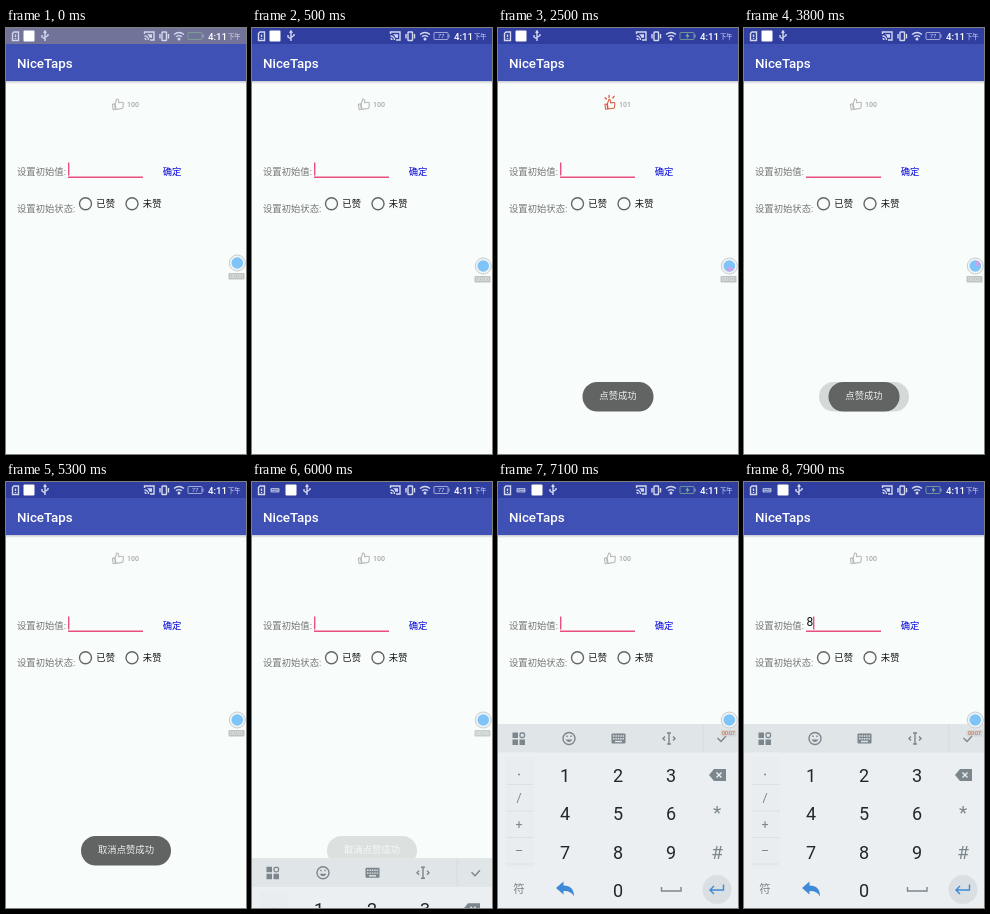
These frames come from a looping animation (240 by 426 pixels, 8000 ms). An HTML page:

```html
<!DOCTYPE html>
<html lang="zh-CN">
<head>
<meta charset="utf-8">
<style>
html, body { margin: 0; width: 100%; height: 100%; overflow: hidden; background: #f8fcfa; }
svg { display: block; width: 100vw; height: 100vh; font: 9.33px Roboto, "Noto Sans CJK SC", "Noto Sans CJK", sans-serif; }
.line { fill: none; stroke-width: 1.4; }
.mid { text-anchor: middle; }
</style>
</head>
<body>
<svg viewBox="0 0 240 426">
  <defs>
    <linearGradient id="shade" x2="0" y2="1"><stop stop-color="#c6cad0"/><stop offset="1" stop-color="#f8fcfa"/></linearGradient>
    <clipPath id="digitClip"><rect x="120" y="72" width="20" height="9"/></clipPath>
  </defs>
  <rect width="240" height="426" fill="#f8fcfa"/>
  <rect y="53" width="240" height="3" fill="url(#shade)"/>
  <rect y="16" width="240" height="37" fill="#3f51b5"/>
  <rect id="status" width="240" height="16" fill="#303f9f"/>
  <text x="11" y="40" font-size="13.33" font-weight="500" fill="#fff">NiceTaps</text>

  <!-- status bar -->
  <g stroke="#d3d8ee" class="line" stroke-width=".9">
    <path d="M6.500 5.500L8 4h4.500v8.500h-6zM9.500 6.500v2.500M9.500 10v1"/>
    <g id="boardIcon"><rect x="18.500" y="6" width="9" height="4.500" rx="1" fill="#a9b1da" stroke="none"/><path d="M20 7.500h6M20.500 9.300h5" stroke="#303f9f" stroke-width=".7" stroke-dasharray="1 .6"/></g>
    <g id="notes">
      <rect x="17.500" y="2.500" width="11" height="11" rx="1" fill="#fff" stroke="none"/>
      <path d="M39 4v9M39 11l-3-2V7M39 9.500l3-2V6M37.700 4.800L39 3l1.300 1.800"/>
    </g>
    <path d="M138.500 6V4h9.500v8h-4M138.500 8a4 4 0 0 1 4 4M138.500 10.500a1.500 1.500 0 0 1 1.500 1.500"/>
    <path d="M141 6.200h5v3.600h-2.500q-.5-2.500-2.500-3.600z" fill="#d3d8ee" stroke="none"/>
    <rect x="156" y="4" width="4.500" height="8.500" rx=".6"/>
    <path d="M154 6v4.500M162.500 6v4.500"/>
    <path d="M168 6.500q5-4 10 0M170 8.800q3-2.400 6 0"/>
    <circle cx="173" cy="11" r=".8" fill="#fff"/>
    <rect id="cell" x="182" y="4.500" width="14" height="7" rx=".8" stroke-width=".8"/>
  </g>
  <path d="M197 6.500v3" stroke="#bcc3e5" stroke-width=".8"/>
  <text id="level" class="mid" x="189" y="10.300" font-size="6" fill="#cfd5ee">77</text>
  <path id="bolt" d="M190 5l-2.500 3.300h2L188.500 11l3-3.500h-2z" fill="#8fd08a"/>
  <text x="202" y="11.700" font-size="9.700" font-weight="500" fill="#fff">4:11</text>
  <text x="222" y="11.200" font-size="6.300" fill="#e4e7f6">下午</text>

  <!-- like button -->
  <g id="hand" class="line" stroke-linejoin="round">
    <g transform="translate(112 76) rotate(-8) scale(.56) translate(-12 -12)" stroke-width="2">
      <path d="M2 11h4v10H2zM7 11l4-8q3 0 3 3l-.5 4H20q2 0 1.600 2L20 19q-.4 2-2.400 2H7z"/>
    </g>
    <path id="rays" d="M108 70.500l-1.500-1.500M111 69v-2.500M115 69.500l1.500-2" stroke-linecap="round"/>
  </g>
  <g font-size="7" font-weight="500" fill="#a6a6a6" clip-path="url(#digitClip)">
    <text x="121" y="78.700">10</text>
    <text id="zero" x="128.900">0</text>
    <text id="one" x="128.900">1</text>
  </g>

  <!-- form -->
  <g fill="#757575">
    <text x="11" y="147">设置初始值:</text>
    <text x="11" y="183.500">设置初始状态:</text>
  </g>
  <text x="156.700" y="147" fill="#0000d8">确定</text>
  <g fill="#111">
    <text x="90.300" y="179">已赞</text>
    <text x="136.800" y="179">未赞</text>
    <text id="typed" x="62.500" y="144" font-size="12">8</text>
  </g>
  <g class="line" stroke="#666"><circle cx="79.500" cy="175.700" r="6"/><circle cx="126" cy="175.700" r="6"/></g>
  <path d="M62 149.200h75" class="line" stroke="#e9507f"/>
  <path id="caret" d="M62.700 134.500v13" class="line" stroke="#e9507f"/>

  <!-- toasts -->
  <g id="toast2"><rect x="75" y="354" width="90" height="29.500" rx="14.700" fill="#616462"/><text class="mid" x="120" y="371.200" fill="#eee">取消点赞成功</text></g>
  <g id="toast1"><rect x="84.500" y="354" width="71" height="29.500" rx="14.700" fill="#616462"/><text class="mid" x="120" y="371.200" fill="#eee">点赞成功</text></g>

  <!-- keyboard -->
  <g id="board">
    <rect y="242" width="240" height="184" fill="#eceff1"/>
    <rect y="242" width="240" height="28.500" fill="#e0e5e8"/>
    <path d="M205 242v28" stroke="#d5dbde"/>
    <g fill="#7b868d">
      <path d="M14.500 250.500h5.500v5.500h-5.500zM14.500 257.500h5.500v5.500h-5.500zM21.500 257.500h5.500v5.500h-5.500z"/>
      <rect x="22" y="251" width="4.500" height="4.500" rx="1.500" fill="none" stroke="#7b868d" stroke-width="1.300"/>
      <rect x="113.500" y="251.500" width="14" height="10" rx="1"/>
      <path d="M67.500 257.500h7q-3.500 5-7 0z"/>
    </g>
    <g class="line" stroke="#7b868d">
      <circle cx="71" cy="256.500" r="6"/>
      <path d="M69 253.500v1.500M73 253.500v1.500"/>
      <path d="M115 254h11M115 256.800h11" stroke="#e0e5e8" stroke-dasharray="1.500 .9"/>
      <path d="M117 259.500h7" stroke="#e0e5e8"/>
      <path d="M169 251h4M171 251v11M169 262h4M167 254.500l-2 2 2 2M175 254.500l2 2-2 2"/>
      <path d="M219.500 256l3.500 3.500 5-5.500"/>
    </g>
    <rect x="8" y="275" width="28" height="111" fill="#e9edef"/>
    <path d="M8 302.500h28M8 329h28M8 355.500h28M8 382h28" stroke="#d9dfe2" stroke-width=".8"/>
    <g id="keys" class="mid" font-size="18" fill="#22272a"></g>
    <g class="mid" fill="#7b868d">
      <circle cx="21" cy="292.500" r="1"/>
      <g font-size="12.500">
        <text x="21" y="320">/</text><text x="21" y="346.500">+</text>
        <text x="21" y="373">–</text><text x="21" y="410.500" font-size="11.500">符</text>
      </g>
      <text x="219" y="337" font-size="19">*</text>
      <text x="219" y="376.500" font-size="19">#</text>
    </g>
    <path d="M211 293l5-6h12v12h-12z" fill="#7b868d"/>
    <path d="M218.500 290.500l5 5M223.500 290.500l-5 5" class="line" stroke="#eceff1"/>
    <path d="M163.500 405v4h19.500v-4" class="line" stroke="#7b868d"/>
    <path d="M58 406l7.500-6.500v4q10.500 0 10.500 11-3-6-10.500-5.500v3.500z" fill="#3f8ad8"/>
    <circle cx="219" cy="407.500" r="14.500" fill="#dadfe3"/>
    <path d="M225.500 402.500v5.500h-13M216 404l-4 4 4 4" class="line" stroke="#3f8ad8" stroke-width="1.600"/>
  </g>

  <!-- floating ball -->
  <g id="ball">
    <circle cx="231.300" r="8" fill="#f1f4f5" stroke="#c6cbcd"/>
    <circle cx="231.300" r="5.800" fill="#7fc4f8"/>
    <path id="wedge" d="M231.300 0v-5.500a5.500 5.500 0 0 1 5.500 5.500z" fill="#c5a5e8"/>
    <rect id="tag" x="222.500" y="10" width="16" height="6.500" rx="1" fill="#bfc3c4"/>
    <text id="clock" class="mid" x="230.500" y="15.200" font-size="5.200">00:00</text>
  </g>
</svg>
<script>
const $ = id => document.getElementById(id);
const ramp = (t, a, b) => Math.min(1, Math.max(0, (t - a) / (b - a)));
const show = (id, alpha) => $(id).setAttribute('opacity', +alpha);
const put = (id, x, y) => $(id).setAttribute('transform', `translate(${x} ${y})`);

[...'1234567890'].forEach((d, i) => {
  const col = i == 9 ? 1 : i % 3, row = Math.floor(i / 3);
  $('keys').innerHTML += `<text x="${67 + 53 * col}" y="${299.5 + 38.5 * row}">${d}</text>`;
});

const LIKE = 1500, UNLIKE = 2450, TYPE = 7850;

function caretOn(t) {
  if (t >= TYPE) return true;
  if (t >= 6000) return (t - 6050) % 1000 < 530;
  return t % 1000 < 550;
}

function draw(now) {
  const t = now % 8000;
  $('status').setAttribute('fill', t < 100 ? '#717398' : '#303f9f');

  // like: press, swap colour, roll the last digit
  const liked = t >= LIKE + 100 && t < UNLIKE + 100;
  const press = [LIKE, UNLIKE].reduce((p, a) => p + Math.sin(Math.PI * ramp(t, a, a + 250)), 0);
  const size = 1 - .15 * press;
  $('hand').setAttribute('stroke', liked ? '#d9573f' : '#b8b8b8');
  $('hand').setAttribute('transform', `translate(112 76) scale(${size}) translate(-112 -76)`);
  show('rays', liked);
  const roll = ramp(t, LIKE + 50, LIKE + 250) - ramp(t, UNLIKE + 50, UNLIKE + 250);
  put('zero', 0, 78.7 - 9 * roll);
  put('one', 0, 87.7 - 9 * roll);
  show('zero', 1 - roll);
  show('one', roll);

  show('toast1', ramp(t, 1730, 2050) - ramp(t, 3820, 4100));
  show('toast2', ramp(t, 3730, 4050) - ramp(t, 5780, 6050));

  show('typed', t >= TYPE);
  put('caret', t >= TYPE ? 7 : 0, 0);
  show('caret', caretOn(t));

  const up = 1 - (1 - ramp(t, 5950, 6300)) ** 2;
  put('board', 0, 184 * (1 - up));
  show('board', up > 0);
  const hasBoard = t >= 6000;
  show('boardIcon', hasBoard);
  put('notes', hasBoard ? 16 : 0, 0);

  const charging = t >= 1600 && t < 2800 || t >= 7000;
  show('bolt', charging);
  show('level', !charging && t >= 100);
  $('cell').setAttribute('stroke', charging || t < 100 ? '#7fa994' : '#bcc3e5');

  put('ball', 0, 235 + 3 * ramp(t, 100, 400));
  show('wedge', t >= 1000 && t < 4500);
  $('wedge').setAttribute('transform', `rotate(${(t - 1800) * .18} 231.3 0)`);
  show('tag', 1 - .6 * up);
  $('clock').setAttribute('fill', up < .5 ? '#eef0f0' : '#c0592f');
  $('clock').textContent = '00:0' + Math.floor(t / 1000);

  requestAnimationFrame(draw);
}
draw(0);
</script>
</body>
</html>
```
